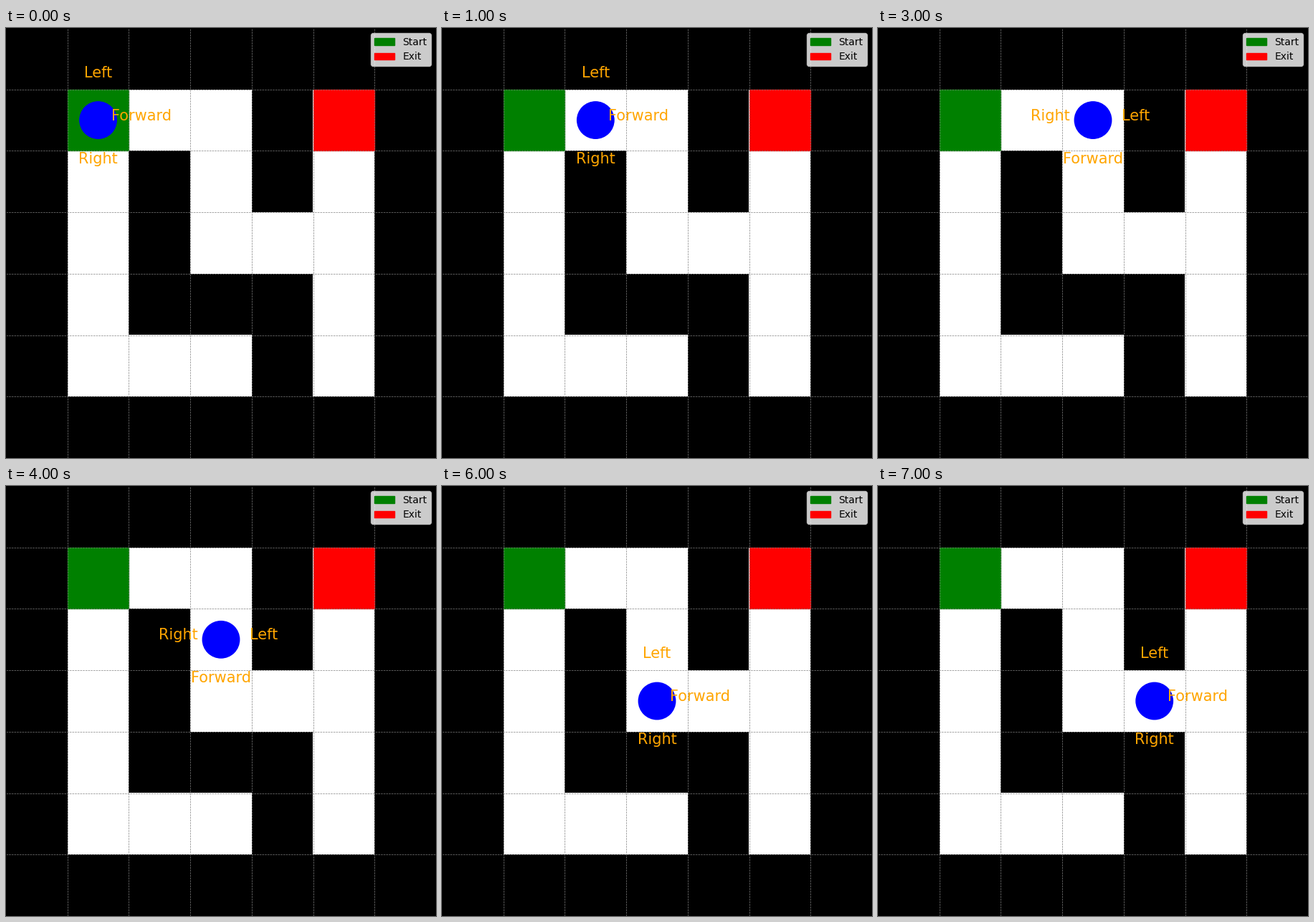
These frames come from a looping animation (600 by 600 pixels, 8 s). A matplotlib script:

```python
import numpy as np
import matplotlib.pyplot as plt
from matplotlib.animation import FuncAnimation
from matplotlib.patches import Circle, Patch, Rectangle

plt.rcParams["font.family"] = "DejaVu Sans"

MAZE = [
    "#######",
    "#...#.#",
    "#.#.#.#",
    "#.#...#",
    "#.###.#",
    "#...#.#",
    "#######",
]
SIZE = len(MAZE)
START, EXIT = (1, 1), (5, 1)
EAST, SOUTH = (1, 0), (0, 1)
LABEL_DIST = 0.7

# (cell, heading) for each second: either a step or a turn
STEPS = [
    ((1, 1), EAST),
    ((2, 1), EAST),
    ((3, 1), EAST),
    ((3, 1), SOUTH),
    ((3, 2), SOUTH),
    ((3, 3), SOUTH),
    ((3, 3), EAST),
    ((4, 3), EAST),
]

fig = plt.figure(figsize=(6, 6), dpi=100)
ax = fig.add_axes([0, 0, 1, 1])

cells = np.array([[c == "." for c in row] for row in MAZE], dtype=float)
ax.imshow(cells, cmap="gray", vmin=0, vmax=1, interpolation="nearest")

edges = np.arange(-0.5, SIZE, 1)
ax.set_xticks(edges)
ax.set_yticks(edges)
ax.tick_params(length=0, labelbottom=False, labelleft=False)
ax.grid(True, color="gray", linestyle="--", linewidth=0.5)

for (x, y), color in ((START, "green"), (EXIT, "red")):
    ax.add_patch(Rectangle((x - 0.5, y - 0.5), 1, 1, color=color))

ax.legend(
    handles=[Patch(color="green", label="Start"), Patch(color="red", label="Exit")],
    loc="upper right",
)

agent = ax.add_patch(Circle(START, 0.3, color="blue"))
labels = {
    name: ax.text(0, 0, name, color="orange", fontsize=15, ha="center")
    for name in ("Forward", "Left", "Right")
}


def update(step):
    (x, y), (dx, dy) = STEPS[step]
    agent.center = (x, y)
    # y grows downwards, so left of (dx, dy) is (dy, -dx)
    sides = {"Forward": (dx, dy), "Left": (dy, -dx), "Right": (-dy, dx)}
    for name, (sx, sy) in sides.items():
        labels[name].set_position((x + LABEL_DIST * sx, y + LABEL_DIST * sy))
    return [agent, *labels.values()]


anim = FuncAnimation(fig, update, frames=len(STEPS), interval=1000,
                     repeat=True, repeat_delay=0)
plt.show()
```
